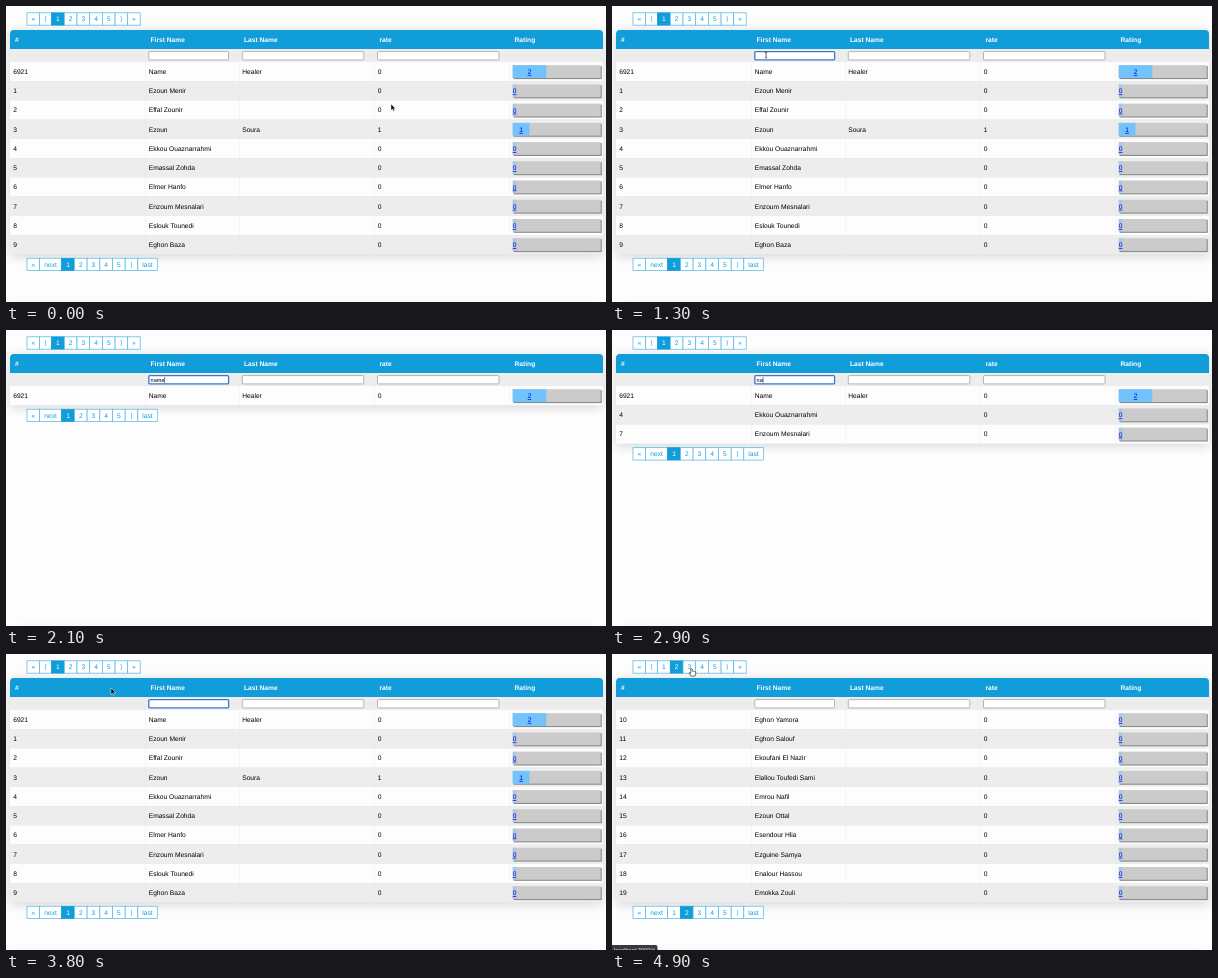
Write an HTML page that moves like this. It is 600 px wide and 296 px high and loops after 5 s.

```html
<!DOCTYPE html>
<html lang="en">
<head>
<meta charset="utf-8">
<title>Filterable rating table</title>
<style>
  html, body { margin: 0; width: 100%; height: 100%; overflow: hidden; background: #fdfdfd; }
  svg { display: block; width: 600px; height: 296px; }
  text { font: 6.667px "Liberation Sans", Arial, sans-serif; text-rendering: geometricPrecision; white-space: pre; }
  .head { font-weight: bold; fill: #fff; }
  .field { font-size: 5.56px; }
  .status { font-size: 5.6px; fill: #eee; }
  .page { text-anchor: middle; fill: #109dd9; }
  .active { fill: #fff; }
  .score { text-anchor: middle; fill: #00e; text-decoration: underline; }
</style>
</head>
<body>
<svg viewBox="0 0 600 296">
  <defs>
    <filter id="blur" x="-10%" y="-30%" width="120%" height="160%"><feGaussianBlur stdDeviation="6"/></filter>
  </defs>
  <g id="scene"></g>
  <g id="pointer"></g>
</svg>
<script>
const LOOP = 5000, STEP = 100;
const BLUE = '#109dd9';
const ROW = 19.22, BODY_TOP = 56;
const COLUMNS = [4, 139.5, 233, 368.5, 503.5];
const HEADINGS = ['#', 'First Name', 'Last Name', 'rate', 'Rating'];

const unrated = (start, names) => names.map((first, i) => ({ id: start + i, first, last: '', rate: 0, score: 0 }));
const pageOne = unrated(1, ['Ezoun Menir', 'Effal Zounir', 'Ezoun', 'Ekkou Ouaznarrahmi', 'Emassal Zohda',
  'Elmer Hanfo', 'Enzoum Mesnalari', 'Eslouk Tounedi', 'Eghon Baza']);
Object.assign(pageOne[2], { last: 'Soura', rate: 1, score: 1 });
pageOne.unshift({ id: 6921, first: 'Name', last: 'Healer', rate: 0, score: 2 });
const pageTwo = unrated(10, ['Eghon Yamora', 'Eghon Salouf', 'Ekoufani El Nazir', 'Elallou Toufedi Sami',
  'Emrou Nafil', 'Ezoun Ottal', 'Esendour Hlia', 'Ezguine Samya', 'Enalour Hassou', 'Emokka Zouli']);

// [time, typed text]
const TYPING = [[0, ''], [1400, 'n'], [1500, 'na'], [1700, 'nam'], [1800, 'name'],
  [2700, 'nam'], [2800, 'na'], [3000, 'n'], [3100, '']];
// [time, x, y]
const PATH = [[0, 385, 98], [100, 385, 98], [700, 250, 68], [1100, 154, 49], [3400, 154, 49],
  [3800, 105, 34], [4200, 66, 14], [4700, 66, 14], [4900, 79.5, 14.5], [5000, 79.5, 14.5]];

const rect = (x, y, w, h, fill, extra = '') =>
  `<rect x="${x}" y="${y}" width="${w}" height="${h}" fill="${fill}" ${extra}/>`;
const text = (x, y, value, name = '') => `<text x="${x}" y="${y}" class="${name}">${value}</text>`;

function pager(y, labels, edges, current) {
  return labels.map((label, i) => {
    const x = edges[i], w = edges[i + 1] - x, active = label === String(current);
    return rect(x, y, w, 12.4, active ? BLUE : '#fff', `stroke="${active ? BLUE : '#55b9e4'}" stroke-width=".75"`)
      + text(x + w / 2, y + 8.5, label, active ? 'page active' : 'page');
  }).join('');
}

function ratingBar(y, score) {
  const x = 506.7, fill = score ? score * 16.8 : 3.7;
  return rect(x + 0.9, y + 0.9, 88.2, 13, '#8a8a8a') + rect(x, y, 88, 12.8, '#cbcbcb')
    + rect(x, y, fill, 12.8, '#72c3fb', score ? '' : 'opacity=".35"')
    + text(x + fill / 2, y + 9, score, 'score');
}

function tableRow(row, i) {
  const y = BODY_TOP + i * ROW, base = y + ROW / 2 + 2.4;
  return rect(4, y, 593, ROW, i % 2 ? '#ededed' : '#fdfdfd')
    + COLUMNS.slice(1).map(x => rect(x, y, 0.5, ROW, i % 2 ? '#e6e6e6' : '#ececec')).join('')
    + [row.id, row.first, row.last, row.rate].map((v, c) => text(COLUMNS[c] + 3.2, base, v)).join('')
    + ratingBar(y + 3.2, row.score);
}

function filters(query, focused, caret) {
  const boxes = [[142.8, 79.8], [236.3, 121.5], [371.5, 121.5]].map(([x, w], i) => {
    const focus = focused && i === 0;
    return rect(x, 45.6, w, 8.3, '#fff',
      `rx="1" stroke="${focus ? '#3a78d2' : '#868686'}" stroke-width="${focus ? 1.3 : 0.6}"`);
  }).join('');
  const caretX = 144.6 + query.length * 2.9 + (query.length > 2 ? 1.9 : 0.4) * (query.length > 1);
  return boxes + text(144.6, 51.8, query, 'field') + (caret ? rect(caretX, 47, 0.5, 5.6, '#000') : '');
}

function scene({ query, focused, caret, rows, page, status }) {
  const bottom = BODY_TOP + rows.length * ROW;
  return rect(0, 0, 600, 296, '#fdfdfd')
    + rect(4, 26, 593, bottom - 24, '#000', 'filter="url(#blur)" opacity=".16"')
    + rect(11, 301, 578, 40, '#000', 'filter="url(#blur)" opacity=".16"')
    + pager(6.8, ['«', '⟨', '1', '2', '3', '4', '5', '⟩', '»'],
        [21, 33.6, 45.6, 58.3, 71, 83.7, 96.4, 109.1, 121.7, 134.2], page)
    + rect(4, 24, 593, 26, BLUE, 'rx="4"') + rect(4, 43, 593, 13, '#ededed')
    + HEADINGS.map((h, i) => text(COLUMNS[i] + 5, 35.8, h, 'head')).join('')
    + filters(query, focused, caret)
    + rows.map(tableRow).join('')
    + pager(bottom + 4, ['«', 'next', '1', '2', '3', '4', '5', '⟩', 'last'],
        [21, 33.6, 55.6, 68.4, 81.1, 93.8, 106.5, 119.2, 131.8, 151.3], page)
    + (status ? rect(-3, 291, 48.5, 12, '#393939', 'rx="2"') + text(2, 297.6, 'localhost:3000/#', 'status') : '');
}

function pointerAt(t) {
  const i = PATH.findIndex(p => p[0] > t);
  const [t0, x0, y0] = PATH[i - 1], [t1, x1, y1] = PATH[i];
  const u = (t - t0) / (t1 - t0), ease = u * u * (3 - 2 * u);
  return [x0 + (x1 - x0) * ease, y0 + (y1 - y0) * ease];
}

const SHAPES = {
  arrow: '<path d="M0 0V6.5L1.5 5.1 2.5 7.3 3.6 6.8 2.6 4.7H4.6Z" fill="#000" stroke="#fff" stroke-width=".5"/>',
  beam: '<path d="M-1.2-3Q0-3 0-2Q0-3 1.2-3M0-2V2M-1.2 3Q0 3 0 2Q0 3 1.2 3" fill="none" stroke="#222" stroke-width=".7"/>',
  hand: '<path d="M-.7 .5Q0-.5 .7 .5V2.6Q1.5 2.2 2 2.9Q2.8 2.5 3.2 3.2Q4.2 3 4.2 4V5.5L3.4 7.6H-.6L-2.5 4.6Q-2.4 3.6-.7 4.8Z" fill="#fff" stroke="#111" stroke-width=".6"/>'
};

function pointer(t) {
  if (t >= 1400 && t < 3400) return '';
  const [x, y] = pointerAt(t);
  const overField = x > 142 && x < 223 && y > 45 && y < 54;
  const shape = overField ? 'beam' : y < 19 ? 'hand' : 'arrow';
  return `<g transform="translate(${x} ${y})">${SHAPES[shape]}</g>`;
}

function stateAt(t) {
  const query = TYPING.filter(k => k[0] <= t).pop()[1];
  const rows = (t < 4600 ? pageOne : pageTwo).filter(r => r.first.toLowerCase().includes(query));
  return {
    query, rows,
    focused: t >= 1200 && t < 4300,
    caret: query !== '',
    page: t < 4500 ? 1 : 2,
    status: t >= 4200
  };
}

const sceneNode = document.getElementById('scene');
const pointerNode = document.getElementById('pointer');
let shown = -1;

function draw(now) {
  const t = Math.floor(now % LOOP / STEP) * STEP;
  if (t !== shown) {
    sceneNode.innerHTML = scene(stateAt(t));
    pointerNode.innerHTML = pointer(t);
    shown = t;
  }
  requestAnimationFrame(draw);
}
draw(performance.now());
</script>
</body>
</html>
```
